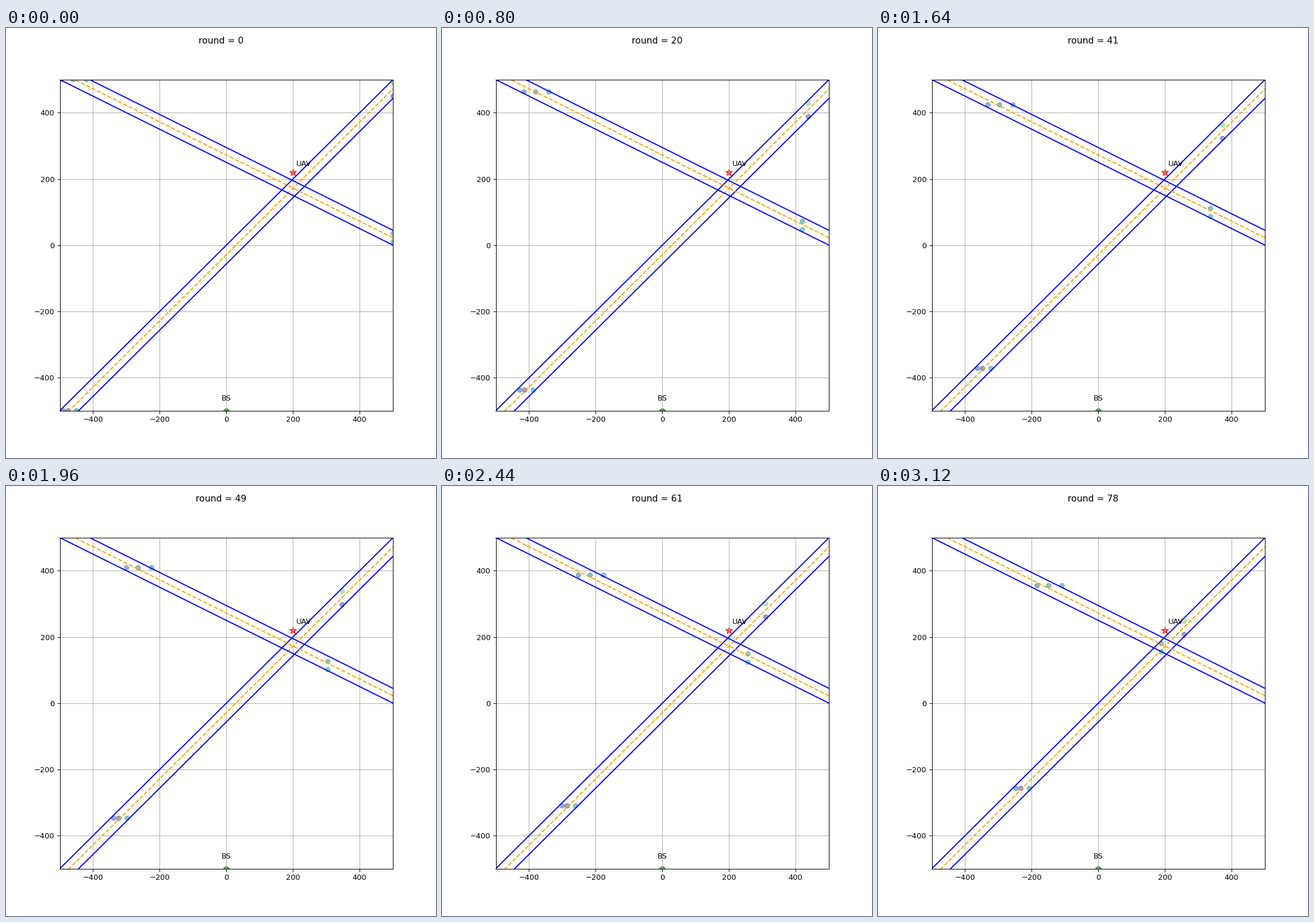
These frames come from a looping animation (748x748 px, 3.16 s). A matplotlib script:

```python
import numpy as np
import matplotlib.pyplot as plt
from matplotlib.animation import FuncAnimation

INCHES, DPI = 8, 93.5    # 748 pixels square
ROUNDS, STEP_MS = 79, 40
HALF = 500      # half side of the field
WIDTH = 40      # road width
SPEED = 4.4     # distance per round

plt.rcParams["font.family"] = "DejaVu Sans"
fig, ax = plt.subplots(figsize=(INCHES, INCHES), dpi=DPI)
fig.subplots_adjust(left=0.125, right=0.9, bottom=0.11, top=0.88)
ax.set(xlim=(-HALF, HALF), ylim=(-HALF, HALF))
ax.grid(True)
title = fig.suptitle("round = 0")


def road(slope, base, side):
    """Two blue edges and a dashed centre line."""
    x = np.array([-HALF, HALF])
    rise = side * WIDTH * np.hypot(1, slope)
    for part, color, style in ((0, "blue", "-"), (1, "blue", "-"),
                               (0.5, "orange", "--")):
        ax.plot(x, slope * x + base + part * rise, style, color=color)


def landmark(x, y, marker, color, size):
    ax.scatter(x, y, s=size, marker=marker, color=color, alpha=0.7)


def heading(deg, count):
    a = np.radians(deg)
    return [(SPEED * np.cos(a), SPEED * np.sin(a))] * count


road(1, 0, -1)
road(-0.5, 250, 1)

landmark(200, 220, "*", "red", 100)
landmark(0, -HALF, "p", "green", 60)
ax.text(210, 240, "UAV")
ax.text(0, -470, "BS", ha="center")

# Cars by entry point: bottom left, top right, top left, right
start = np.array([
    (-490, -HALF), (-475, -HALF), (-450, -HALF),
    (HALF, 490), (HALF, 450),
    (-495, HALF), (-460, HALF), (-420, HALF),
    (HALF, 10), (HALF, 35),
], dtype=float)
velocity = np.array(heading(45, 3) + heading(225, 2)
                    + heading(-25, 3) + heading(155, 2))
shade = [0.33, 0.21, 0.50, 0.80, 0.23, 0.34, 0.44, 0.47, 0.59, 0.50]
cars = ax.scatter(start[:, 0], start[:, 1], s=36, c=shade, cmap="viridis",
                  vmin=0, vmax=1, alpha=0.5)


def update(n):
    cars.set_offsets(start + n * velocity)
    title.set_text(f"round = {n}")
    return cars, title


anim = FuncAnimation(fig, update, frames=ROUNDS, interval=STEP_MS,
                     repeat=True, repeat_delay=0, blit=False)
plt.show()
```
